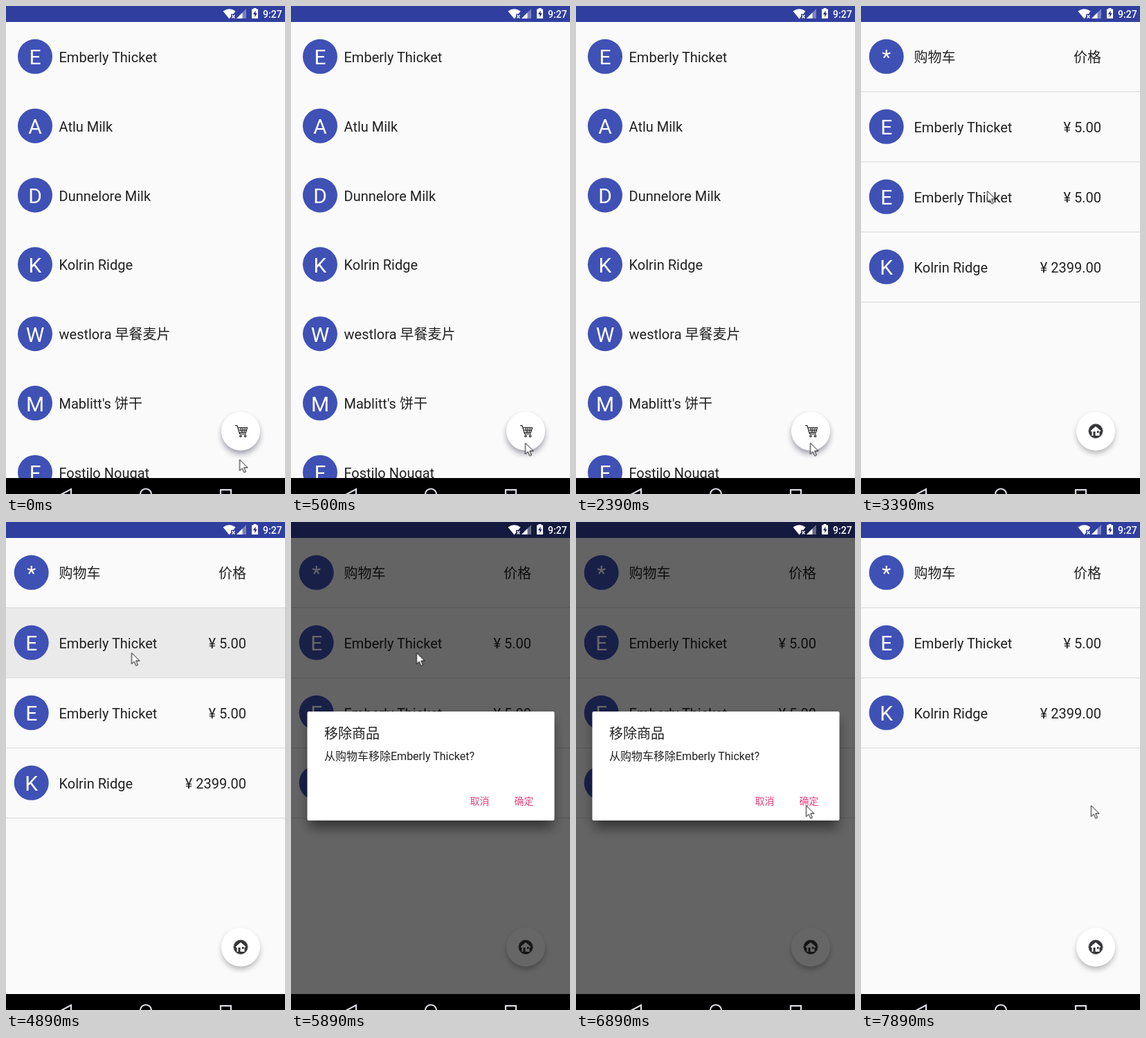
Write an HTML page that moves like this. It is 403x703 px and loops after 8 s.

```html
<!DOCTYPE html>
<html lang="zh-CN">
<head>
<meta charset="utf-8">
<title>购物车</title>
<style>
html, body { margin: 0; width: 100%; height: 100%; overflow: hidden; background: #fafafa; }
svg { display: block; width: 403px; height: 703px; }
text { font-family: Roboto, "Noto Sans CJK SC", "Noto Sans CJK", sans-serif; font-size: 20px; fill: #212121; white-space: pre; }
.letter { font-size: 30px; fill: #fff; text-anchor: middle; }
.price { text-anchor: end; }
.message { font-size: 16px; }
.button { font-size: 14px; font-weight: 500; fill: #e8407f; }
.clock { font-size: 14px; font-weight: 500; fill: #fff; }
.avatar { fill: #3f51b5; }

.list, .cart, .press, .dialog, .cursor, .gone, .moveUp, .lifted { animation: 8s step-end infinite; }
.list { animation-name: list; }
.cart { animation-name: cart; }
.press { animation-name: press; }
.dialog { animation-name: dialog; }
.cursor { animation-name: cursor; }
.gone { animation-name: gone; }
.moveUp { animation-name: moveUp; }
.lifted { animation-name: lifted; }

@keyframes list {
  0%, 29.875% { visibility: visible; }
  17.375%, 42.375%, 100% { visibility: hidden; }
}
@keyframes cart {
  0%, 29.875% { visibility: hidden; }
  17.375%, 42.375%, 100% { visibility: visible; }
}
@keyframes press {
  0%, 73.625%, 100% { opacity: 0; }
  61.125% { opacity: 1; }
}
@keyframes dialog {
  0%, 98.625%, 100% { visibility: hidden; }
  73.625% { visibility: visible; }
}
@keyframes gone {
  0% { opacity: 1; }
  98.625%, 100% { opacity: 0; }
}
@keyframes moveUp {
  0% { transform: none; }
  98.625%, 100% { transform: translateY(-101px); }
}
@keyframes lifted {
  0% { opacity: 1; }
  42.375%, 100% { opacity: 0; }
}
@keyframes cursor {
  0% { transform: translate(337.5px, 653.5px); }
  6.25% { transform: translate(338.5px, 629.5px); }
  42.375% { transform: translate(182.5px, 266.5px); }
  48.625% { transform: translate(182.5px, 192.5px); }
  54.875% { transform: translate(181.5px, 188.5px); }
  79.875% { transform: translate(328.5px, 388.5px); }
  86.125%, 100% { transform: translate(332.5px, 408.5px); }
}
</style>
</head>
<body>
<svg viewBox="0 0 403 703">
  <defs>
    <filter id="soft" x="-50%" y="-50%" width="200%" height="200%"><feGaussianBlur stdDeviation="4"/></filter>
    <filter id="wide" x="-20%" y="-30%" width="140%" height="160%"><feGaussianBlur stdDeviation="9"/></filter>
  </defs>
  <rect width="403" height="703" fill="#fafafa"/>
  <rect width="403" height="23" fill="#303f9f"/>

  <g class="list" id="list"></g>
  <g class="cart" id="cart"></g>

  <!-- floating button -->
  <circle cx="339" cy="617" r="27" fill="#000" opacity=".3" filter="url(#soft)"/>
  <circle class="lifted" cx="339" cy="619" r="27" fill="#404878" fill-opacity=".2" filter="url(#soft)"/>
  <circle cx="339" cy="612.5" r="28" fill="#fff"/>
  <g class="list" fill="none" stroke="#111" stroke-width="1.1">
    <path d="M331 604.5h3l3.500 12h9.500M335 607.500h13.500l-2 7h-9.500M335.800 611h11.700M339 607.500l1 7M342 607.500v7M345.300 607.500l-1 7"/>
    <circle cx="339" cy="619.500" r="1.300"/>
    <circle cx="345.500" cy="619.500" r="1.300"/>
  </g>
  <g class="cart">
    <circle cx="339" cy="612.300" r="10.200" fill="#333338" stroke="#777" stroke-width="1"/>
    <path d="M332 611.500l7-6 7 6v1.500h-1.500v6h-11v-6H332z" fill="#fff"/>
    <path d="M335.500 613h3v6h-3zM341 612h2.500v3H341z" fill="#333338"/>
  </g>

  <g class="dialog">
    <rect width="403" height="680" opacity=".6"/>
    <rect x="26" y="284" width="352" height="156" rx="4" opacity=".5" filter="url(#wide)"/>
    <rect x="23.500" y="273" width="357" height="157" rx="2" fill="#fff"/>
    <text x="48" y="312">移除商品</text>
    <text class="message" id="message" x="48" y="343"></text>
    <text class="button" x="258.500" y="407">取消</text>
    <text class="button" x="322.500" y="407">确定</text>
  </g>

  <!-- status icons -->
  <g fill="#fff">
    <path d="M313.500 7.500Q322.500 1 331.500 7.500L328.500 11.500H325V15.500L322.500 18.500Z"/>
    <path d="M326.500 13l4 4.500m0-4.500l-4 4.500" stroke="#fff" stroke-width="1.300"/>
    <path d="M347 4v14h-14z" opacity=".35"/>
    <path d="M341.500 9.500V18H333z"/>
    <path d="M357.500 4.500V3h4v1.500h2.500V18h-9V4.500z"/>
    <path d="M360.500 6.500l-3.500 5.500h2.300v4l3.400-5.500h-2.200z" fill="#222c70"/>
    <text class="clock" x="371" y="16.500">9:27</text>
  </g>

  <!-- navigation bar -->
  <rect y="680" width="403" height="23"/>
  <g fill="none" stroke="#dcdce4" stroke-width="2.200">
    <path d="M94 712V696L79 704z"/>
    <circle cx="202" cy="703.500" r="8"/>
    <rect x="310" y="697" width="15" height="15"/>
  </g>

  <path class="cursor" d="M0 0V16l3.700-3.500 2.600 6 2.600-1.100-2.600-5.900H11.500z" fill="#fff" stroke="#111"/>
</svg>
<script>
const forest = 'Emberly Thicket', ridge = 'Kolrin Ridge';
const products = [forest, 'Atlu Milk', 'Dunnelore Milk', ridge,
  'westlora 早餐麦片', "Mablitt's 饼干", 'Fostilo Nougat'];
const cartRows = [
  ['*', '购物车', '价格'],
  ['E', forest, '¥ 5.00', 'press'],
  ['E', forest, '¥ 5.00', '', 'gone'],
  ['K', ridge, '¥ 2399.00', '', 'moveUp']
];

const item = (x, y, letter, name) =>
  `<circle class="avatar" cx="${x}" cy="${y}" r="25"/>
   <text class="letter" x="${x}" y="${y + 11.5}">${letter}</text>
   <text x="76.500" y="${y + 8}">${name}</text>`;

document.getElementById('list').innerHTML = products
  .map((name, i) => item(42, 72.8 + 99.85 * i, name[0].toUpperCase(), name)).join('');

document.getElementById('cart').innerHTML = cartRows.map(([letter, name, price, press, move], i) => {
  const y = 72.8 + 101 * i;
  const shade = press ? `<rect class="${press}" y="124" width="403" height="100" fill="#eaeaea"/>` : '';
  return `<g class="${move || ''}">${shade}${item(36.7, y, letter, name)}
    <text class="price" x="347" y="${y + 8}">${price}</text>
    <rect y="${123 + 101 * i}" width="403" height="1" fill="#d9d9d9"/></g>`;
}).join('');

document.getElementById('message').textContent = `从购物车移除${forest}?`;
</script>
</body>
</html>
```
